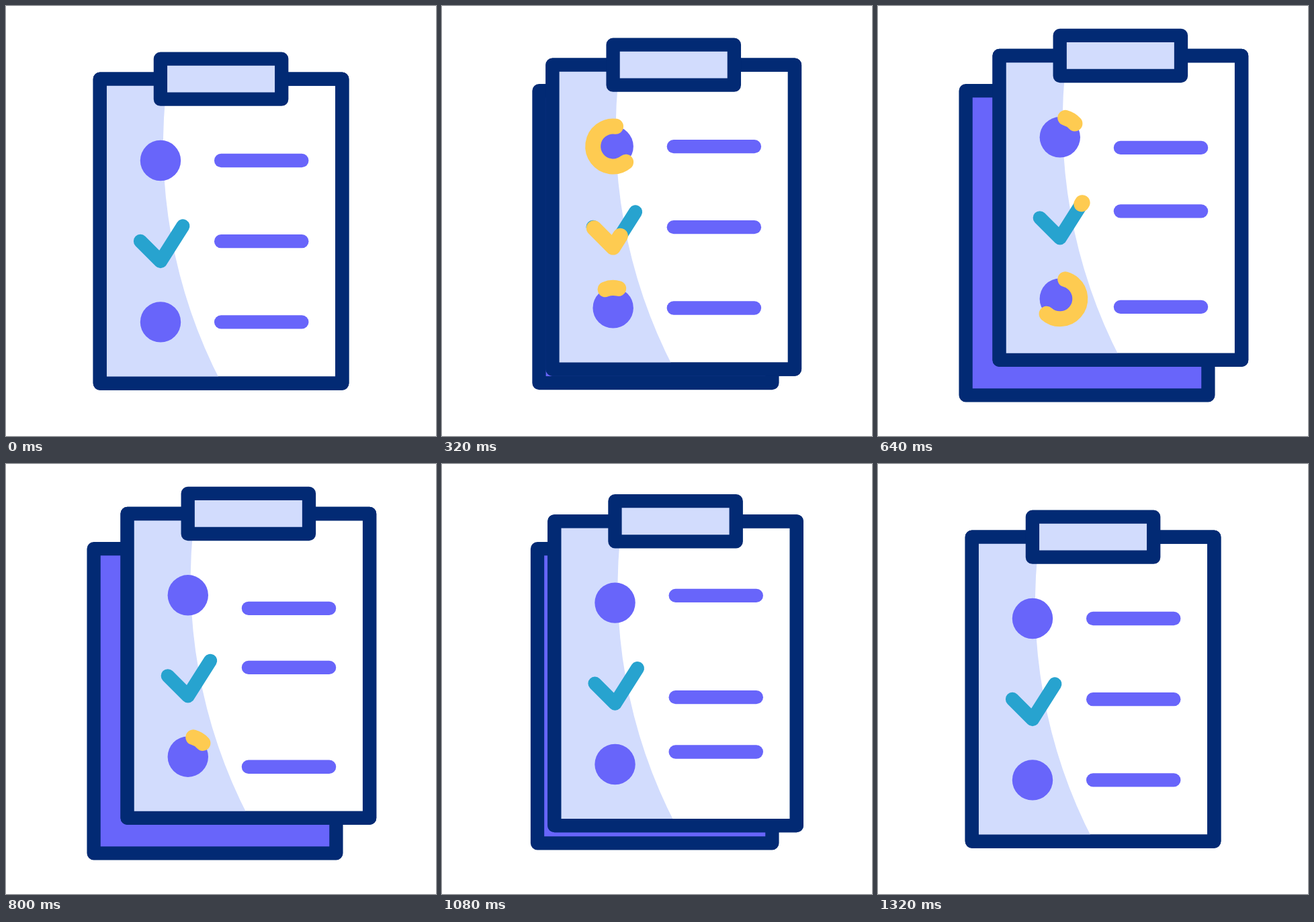
Recreate the animation shown at these times as an HTML page with a canvas. Size 640x640 px, loop 1480 ms.

```html
<!DOCTYPE html>
<html lang="en">
<head>
<meta charset="utf-8">
<title>Clipboard checklist</title>
<style>
  html, body { margin: 0; height: 100%; overflow: hidden; background: #fff; }
  canvas { display: block; }
</style>
</head>
<body>
<canvas id="stage" width="640" height="640"></canvas>
<script>
const ctx = document.getElementById('stage').getContext('2d');
const LOOP = 1480, STROKE = 20.3, TAU = Math.PI * 2;
const NAVY = '#022a74', PURPLE = '#6865fa', PALE = '#d2dcfd', TEAL = '#27a3cf', YELLOW = '#fecb51';

const ROWS = [230, 350.2, 470.4];
const LINE_TIMES = [302, 784, 1074, 1318];
const LINE_SHIFTS = [[0, 19.8, -10.8, 0], [0, -12.9, 20.4, 0], [0, 15.4, -18.5, 0]];
const CHECK = [[200, 350], [230, 380], [263.3, 327.5]];

const mix = (a, b, k) => a + (b - a) * k;

// Smooth 0 to 1 between two moments.
function ease(t, from, to) {
  const u = Math.min(1, Math.max(0, (t - from) / (to - from)));
  return u * u * (3 - 2 * u);
}

function keyed(t, times, values) {
  let v = values[0];
  for (let i = 1; i < times.length; i++) {
    v += (values[i] - values[i - 1]) * ease(t, times[i - 1], times[i]);
  }
  return v;
}

function stroke(color, width = STROKE) {
  ctx.strokeStyle = color;
  ctx.lineWidth = width;
  ctx.stroke();
}

function polyline(points, color, width) {
  ctx.beginPath();
  points.forEach(p => ctx.lineTo(...p));
  stroke(color, width);
}

function box(left, top, right, bottom, fill) {
  ctx.beginPath();
  ctx.rect(left, top, right - left, bottom - top);
  ctx.fillStyle = fill;
  ctx.fill();
  stroke(NAVY);
}

function dot(y) {
  ctx.beginPath();
  ctx.arc(230, y, 30.2, 0, TAU);
  ctx.fillStyle = PURPLE;
  ctx.fill();
}

// Yellow sweep running counterclockwise from just right of the top.
function ring(y, t) {
  const head = ease(t, 80, 480), tail = ease(t, 282, 722);
  if (head <= tail) return;
  const origin = -TAU / 4 + 0.27;
  ctx.beginPath();
  ctx.arc(230, y, 30, origin - tail * TAU, origin - head * TAU, true);
  stroke(YELLOW, 23);
}

function checkSweep(t) {
  const head = ease(t, 100, 492), tail = ease(t, 286, 676);
  if (head <= tail) return;
  const [a, b, c] = CHECK;
  const bend = 0.404;
  const at = p => {
    const [from, to, k] = p < bend ? [a, b, p / bend] : [b, c, (p - bend) / (1 - bend)];
    return [mix(from[0], to[0], k), mix(from[1], to[1], k)];
  };
  const corner = tail < bend && head > bend ? [b] : [];
  polyline([at(tail), ...corner, at(head)], YELLOW, 23);
}

function draw(t) {
  ctx.fillStyle = '#fff';
  ctx.fillRect(0, 0, 640, 640);
  ctx.lineCap = ctx.lineJoin = 'round';

  const lift = ease(t, 110, 480) - ease(t, 940, 1310);
  box(mix(165.7, 130.6, lift), 126.2, 491.4, mix(533.3, 579.3, lift), PURPLE);

  ctx.save();
  ctx.translate(40.8 * lift, -34.7 * lift);

  box(139.8, 108.7, 500.3, 561.6, '#fff');
  ctx.beginPath();
  ctx.moveTo(139.8, 561.6);
  ctx.lineTo(139.8, 108.7);
  ctx.arc(1001, 207, 767, Math.PI + 0.128, Math.PI - 0.481, true);
  ctx.fillStyle = PALE;
  ctx.fill();
  ctx.beginPath();
  ctx.rect(139.8, 108.7, 360.5, 452.9);
  stroke(NAVY);
  box(229.9, 78.6, 410.2, 138.7, PALE);

  ROWS.forEach((row, i) => {
    const y = row + keyed(t, LINE_TIMES, LINE_SHIFTS[i]);
    polyline([[320.1, y], [440.3, y]], PURPLE);
  });

  dot(ROWS[0]);
  polyline(CHECK, TEAL);
  dot(ROWS[2]);
  ring(ROWS[0], t);
  checkSweep(t);
  ring(ROWS[2], t - 160);
  ctx.restore();
}

const start = performance.now();
function tick() {
  draw((performance.now() - start) % LOOP);
  requestAnimationFrame(tick);
}
tick();
</script>
</body>
</html>
```
